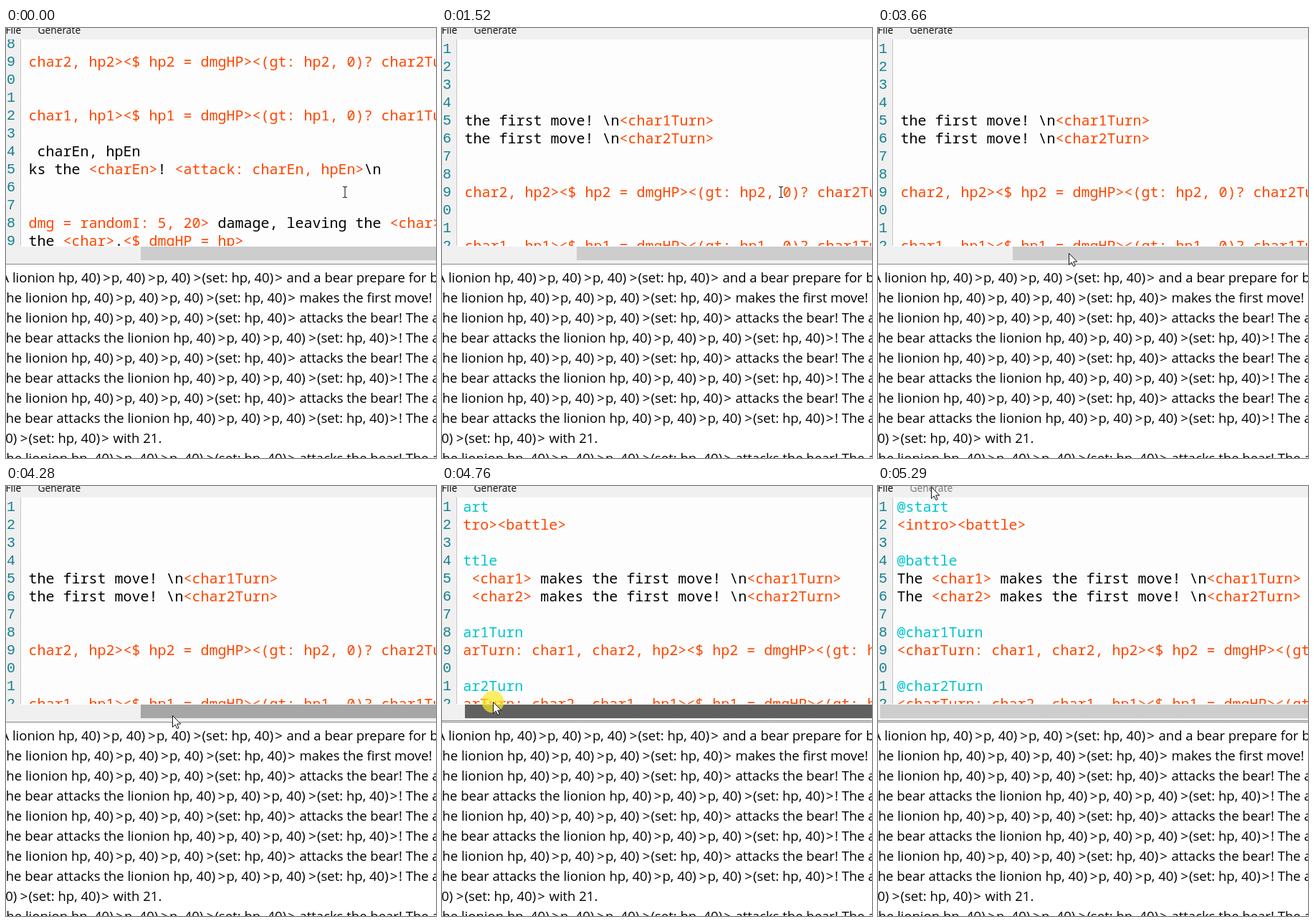
Recreate the animation shown at these times as an HTML page. Size 600 px wide and 600 px high, loop 8 s.

```html
<!DOCTYPE html>
<html lang="en">
<head>
<meta charset="utf-8">
<style>
html, body { margin: 0; width: 100%; height: 100%; overflow: hidden; background: #fff; }
svg { display: block; width: 600px; height: 600px; }
text { white-space: pre; }
.code { font: 300 20px "Noto Sans Mono", monospace; }
.number { font: 20px "Liberation Mono", monospace; fill: #128291; }
.output { font: 18.5px "Open Sans", sans-serif; }
.menu { font: 13.8px "Open Sans", sans-serif; }
</style>
</head>
<body>
<svg viewBox="0 0 600 600">
  <defs><clipPath id="pane"><rect y="16" width="600" height="288"/></clipPath></defs>
  <rect width="600" height="329" fill="#f0f0f0"/>
  <rect x="20" y="16" width="580" height="289" fill="#fdfdfd"/>
  <rect x="20" y="16" width="1" height="288" fill="#c4c4c4"/>
  <g clip-path="url(#pane)">
    <g id="numbers" class="number"></g>
    <g id="code" class="code"></g>
  </g>
  <g class="menu">
    <text x="-.5" y="8">File</text>
    <text id="generate" x="44.5" y="8">Generate</text>
  </g>
  <rect id="thumb" y="305" width="620" height="19"/>
  <path id="focus" d="M0 327.5H600" stroke="#222" stroke-dasharray="1 1"/>
  <rect y="329" width="600" height="1" fill="#858585"/>
  <g id="output" class="output"></g>
  <circle id="halo" r="15.5" fill="#fae628" fill-opacity=".72"/>
  <path id="beam" d="M-3 -7.5H-1L0 -6.5L1 -7.5H3M0 -6.5V6.5M-3 7.5H-1L0 6.5L1 7.5H3"
    fill="none" stroke="#222" stroke-width="1.1"/>
  <path id="arrow" d="M.5 .5V16.5L4.2 13L6.8 18.6L9.2 17.5L6.7 12H11.8Z" fill="#fff" stroke="#111"/>
</svg>
<script>
const LOOP = 8000, LINE = 25, CHAR = 12;
const COLORS = { tag: "#ff4500", label: "#00c5cd", plain: "#000" };

const source = `@start
<intro><battle>

@battle
The <char1> makes the first move! \\n<char1Turn>
The <char2> makes the first move! \\n<char2Turn>

@char1Turn
<charTurn: char1, char2, hp2><$ hp2 = dmgHP><(gt: hp2, 0)? char2Turn>

@char2Turn
<charTurn: char2, char1, hp1><$ hp1 = dmgHP><(gt: hp1, 0)? char1Turn>

@charTurn: charAt, charEn, hpEn
The <charAt> attacks the <charEn>! <attack: charEn, hpEn>\\n


The attack deals <dmg = randomI: 5, 20> damage, leaving the <char>
The attack missed the <char>.<$ dmgHP = hp>
`.split("\n");

// Each step holds until the next one.
const scrollSteps = [[0, 182], [920, 125], [990, 50], [1520, 0]];
const pointerSteps = [
  [0, 473, 229], [2180, 390, 268], [2250, 269, 307],
  [3660, 266, 314], [3730, 260, 322], [3800, 252, 328], [3870, 246, 329], [4000, 239, 323],
  [4140, 237, 322], [4210, 234, 321], [4280, 232, 320], [4350, 227, 315],
  [4550, 216, 313], [4620, 178, 309], [4690, 124, 304], [4760, 71, 301],
  [4830, 55, 301], [4900, 46, 301], [4960, 41, 301], [5290, 74, 1]
];

const $ = id => document.getElementById(id);
const at = (steps, t) => steps.findLast(step => step[0] <= t);
const move = (node, x, y) => node.setAttribute("transform", `translate(${x} ${y})`);
const show = (node, on) => node.setAttribute("visibility", on ? "visible" : "hidden");

function addText(parent, x, y, content, attrs = {}) {
  const node = document.createElementNS("http://www.w3.org/2000/svg", "text");
  for (const [key, value] of Object.entries({ x, y, ...attrs })) node.setAttribute(key, value);
  node.textContent = content;
  parent.append(node);
  return node;
}

const runs = [];
source.forEach((line, row) => {
  addText($("numbers"), 1, 35 + row * LINE, (row + 1) % 10);
  for (const match of line.matchAll(/<[^>]*>|@\w+|[^<@]+/g)) {
    const content = match[0], col = match.index;
    const kind = content[0] === "<" ? "tag" : content[0] === "@" ? "label" : "plain";
    const node = addText($("code"), 0, 36 + row * LINE, content, { fill: COLORS[kind] });
    runs.push({ node, content, col });
  }
});

function addOutput(row, x, before, after) {
  const y = 355 + row * 28;
  const put = (dx, content, anchor = "start") =>
    addText($("output"), x + dx, y, content, { "text-anchor": anchor });
  // A group ends with a centred bracket just before the next group.
  const group = (dx, content, end) => {
    put(dx, content);
    put(end - 6.5, ">", "middle");
  };
  put(-5, before, "end");
  group(0, "hp, 40)", 74);
  group(74, "p, 40)", 137);
  group(137, "p, 40)", 200.5);
  group(200.5, "(set: hp, 40)", 314);
  put(after[0] === "!" ? 314.5 : 318.5, after);
}

const lionHits = row => addOutput(row, 91, "The lionion", "attacks the bear! The attack");
const bearHits = row => addOutput(row, 233.5, "The bear attacks the lionion", "! The attack");
addOutput(0, 73, "A lionion", "and a bear prepare for battle");
addOutput(1, 91, "The lionion", "makes the first move!");
for (const row of [2, 4, 6]) { lionHits(row); bearHits(row + 1); }
addOutput(8, -169, "", "with 21.");
lionHits(9);

let lastScroll;
function scrollCode(left) {
  if (left === lastScroll) return;
  lastScroll = left;
  // Characters cut by the left edge are left out entirely.
  const first = Math.ceil(left / CHAR);
  for (const { node, content, col } of runs) {
    const skip = Math.max(0, first - col);
    node.textContent = content.slice(skip);
    node.setAttribute("x", 26.4 + (col + skip) * CHAR - left);
  }
}

function render(t) {
  const [, x, y] = at(pointerSteps, t);
  const top = at(scrollSteps, t)[1];
  const pressed = t >= 4550 && t < 5290;
  const thumbX = t < 4550 ? 188 : pressed ? Math.max(3, Math.min(188, x - 39)) : 3;

  scrollCode((thumbX - 3) * 211 / 185);
  move($("numbers"), 0, -top);
  move($("code"), 0, -top);
  $("thumb").setAttribute("x", thumbX);
  $("thumb").setAttribute("fill", pressed ? "#606060" : t >= 4140 && t < 4550 ? "#a6a6a6" : "#cdcdcd");
  $("generate").setAttribute("fill", t >= 5290 ? "#777" : "#111");
  show($("focus"), t >= 4550);
  show($("halo"), pressed);
  show($("beam"), t < 2250);
  show($("arrow"), t >= 2250);
  for (const id of ["halo", "beam", "arrow"]) move($(id), x, y);
}

function tick() {
  render(performance.now() % LOOP);
  requestAnimationFrame(tick);
}
tick();
</script>
</body>
</html>
```
